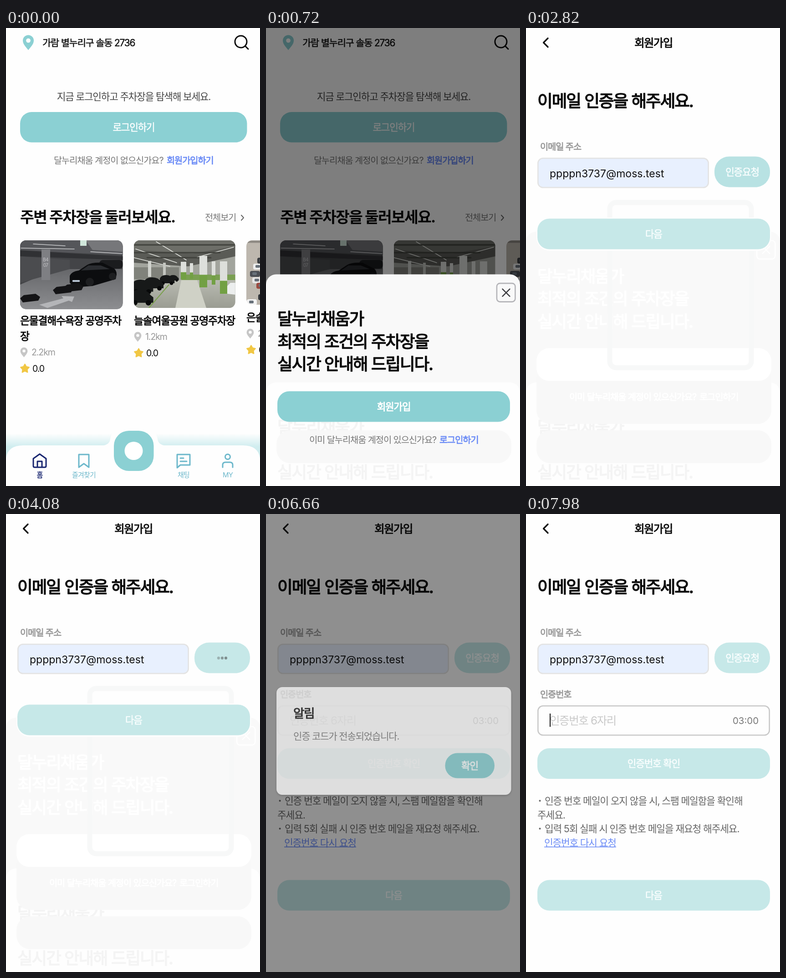
These frames come from a looping animation (558x1003 px, 8 s). An HTML page:

```html
<!DOCTYPE html>
<html lang="ko">
<head>
<meta charset="utf-8">
<title>Sign-up flow</title>
<style>
  html, body { margin: 0; width: 100%; height: 100%; overflow: hidden; background: #fefefe; }
  svg { display: block; width: 100vw; height: 100vh; }
  text { font-family: Inter, 'Noto Sans CJK KR', 'Noto Sans CJK', sans-serif; letter-spacing: -.055em; white-space: pre; }
  .latin { letter-spacing: 0; }
  .system { font-family: 'Noto Sans', sans-serif; letter-spacing: 0; }
  .pale text { fill: #fff; stroke: #fff; }
  .pale .fill { fill: #fff; }
  .pale .line { stroke: #fff; }
  .trace text { fill: #f4f4f4; stroke: #f4f4f4; }
  .trace .fill, .trace .line { display: none; }
</style>
</head>
<body>
<svg id="stage" viewBox="0 0 558 1003" preserveAspectRatio="none"></svg>
<script>
const LOOP = 8000, STEP = 60, SHEET_TOP = 446, SHEET_TRAVEL = 557;
const TEAL = '#8bd0d3', MIST = '#c6e8e8', LINK = '#6c8cf6', GRAY = '#777', NAV = '#6db8cb';
const BRAND = '달누리채움';
const EMAIL = 'ppppn3737@moss.test', SAMPLE = 'xyz@e.test';
const MEDIUM = .022, SEMI = .04;

// y is the optical middle of the line; bold is a stroke width in em, for weights between regular and bold
const text = (x, y, size, str, fill = '#0b0b0b', bold = 0, anchor = 'start', extra = '') =>
  `<text x="${x}" y="${y + size * .37}" font-size="${size}" fill="${fill}" text-anchor="${anchor}" ` +
  `${bold ? `stroke="${fill}" stroke-width="${size * bold}" stroke-linejoin="round"` : ''} ${extra}>${str}</text>`;
const mid = (x, y, size, str, fill, bold) => text(x, y, size, str, fill, bold, 'middle');
const rect = (x, y, x2, y2, r, fill, extra = '') =>
  `<rect x="${x}" y="${y}" width="${x2 - x}" height="${y2 - y}" rx="${r}" fill="${fill}" ${extra}/>`;
const path = (d, fill, extra = '') => `<path d="${d}" fill="${fill}" ${extra}/>`;
const line = (d, color, width, extra = '') =>
  path(d, 'none', `stroke="${color}" stroke-width="${width}" stroke-linecap="round" stroke-linejoin="round" ${extra}`);
const dot = (x, y, r, fill, extra = '') => `<circle cx="${x}" cy="${y}" r="${r}" fill="${fill}" ${extra}/>`;
const group = (id, body, extra = '') => `<g id="${id}" ${extra}>${body}</g>`;
const at = (x, y, body, scale = 1, extra = '') => `<g transform="translate(${x} ${y}) scale(${scale})" ${extra}>${body}</g>`;
const gradient = (id, stops) => `<linearGradient id="${id}" x2="0" y2="1">` +
  stops.map(([offset, color, alpha = 1]) => `<stop offset="${offset}" stop-color="${color}" stop-opacity="${alpha}"/>`).join('') +
  '</linearGradient>';

const pin = (x, y, scale, fill) => at(x, y,
  path('M0 17C-3 12-12 5-12-4A12 12 0 0 1 12-4C12 5 3 12 0 17Z', fill) + dot(0, -4, 4.8, '#fff'), scale);

function star(x, y) {
  const points = Array.from({ length: 10 }, (_, i) => {
    const a = i * Math.PI / 5, r = i % 2 ? 5.4 : 10;
    return `${(x + r * Math.sin(a)).toFixed(1)} ${(y - r * Math.cos(a)).toFixed(1)}`;
  });
  return path(`M${points.join('L')}Z`, '#f1c744', 'stroke="#f1c744" stroke-width="2" stroke-linejoin="round"');
}

const spot = (x, y, distance) =>
  pin(x + 8.5, y, .66, '#c6c6c6') + text(x + 25, y, 19.5, distance, '#999') +
  star(x + 10.5, y + 36) + text(x + 27, y + 36, 19.5, '0.0');

const darkGarage = () => {
  const rack = (x, y) => path(`M${x} ${y}l8-7 26-3 10 7-4 8-34 4Z`, '#141416');
  return rect(31, 465, 257, 616, 0, '#434447') +
    path('M31 465H257V497L140 492 31 486Z', '#55565a') +
    path('M175 465H257V490L190 486Z', '#76777a') +
    path('M31 487L257 500V508L31 500Z', '#303134') +
    path('M31 562L110 528H257V616H31Z', 'url(#floor)') +
    path('M31 500L140 508V528L31 558Z', '#4b4c4f') +
    line('M33 482L150 484M186 490L255 494M60 473L130 477', '#c9cacc', 1.6) +
    rect(78, 485, 97, 552, 0, '#7e7f83') + rect(163, 465, 177, 477, 0, '#cfe6da') +
    mid(87, 507, 10, 'B4', '#c5c5c8') + mid(87, 519, 10, '07', '#c5c5c8') +
    rect(205, 508, 257, 527, 8, '#1b1c1e') +
    path('M140 558V543Q144 533 160 531L178 519Q188 513 212 514L234 525Q243 528 243 540L241 550 190 565 150 568Z', '#0c0d0f') +
    path('M165 531L181 520H208L228 528Z', '#2b2d31') +
    dot(184, 556, 9, '#1d1e20') + dot(234, 544, 8, '#1d1e20') +
    rect(146, 552, 162, 556, 1, '#b7c3d2') +
    rack(31, 592) + rack(103, 574) + rack(126, 569) +
    path('M73 606L126 592 122 587 150 588 145 600 138 597 91 613Z', '#b4b5b8');
};

const brightGarage = () => {
  const column = (x, w, top, bottom) =>
    rect(x, top, x + w, bottom, 0, '#dddfdb') + rect(x, bottom - (bottom - top) * .4, x + w, bottom, 0, '#72a044');
  const car = (x, y, s) => at(x, y, path('M0 24V10Q4 0 18 0T38 10L43 14V24Z', '#171919') + dot(9, 24, 5, '#08090a') + dot(34, 24, 5, '#08090a'), s);
  return rect(281, 465, 504, 613, 0, '#a2a49d') +
    path('M281 465H504V500L400 522 281 514Z', '#5a5b56') +
    path('M281 465H504V478L410 494 281 486Z', '#6d6e68') +
    rect(281, 524, 380, 550, 0, '#80827b') + rect(385, 540, 504, 558, 0, '#7a9f52') +
    path('M360 552H504V613H281V600Z', 'url(#gloss)') + path('M385 552H420L440 613H372Z', '#cfd1c6') +
    line('M285 484L375 514M330 468L396 508M500 480L420 502M281 503L360 522', '#dfe1dc', 1.6) +
    line('M281 475H504M281 492H470M310 503H450', '#41423d', 3) +
    column(384, 12, 512, 550) + column(404, 7, 515, 549) +
    column(452, 8, 511, 562) + column(425, 17, 499, 568) + column(470, 16, 511, 582) +
    rect(312, 510, 319, 545, 0, '#d0d2cd') + rect(345, 514, 351, 543, 0, '#c4c6c0') +
    car(358, 541, .5) + car(338, 541, .75) + car(303, 546, 1) + car(276, 551, 1.1) + car(272, 573, 1.2) +
    line('M314 613L358 562', '#7ba04e', 2) +
    path('M486 582V565L493 558H504V584Z', '#eceeee');
};

const carPark = () => {
  const van = (x, y, c) => rect(x, y, x + 22, y + 13, 4, c) + rect(x + 5, y + 3, x + 15, y + 9, 2, '#68717a');
  return rect(528, 465, 570, 606, 0, '#bdb7ae') + line('M529 468H558', '#8e8a83', 5) +
    van(552, 503, '#3a3d41') + van(543, 516, '#edeeee') + van(536, 532, '#4a4e54') +
    van(541, 546, '#e6e6e6') + van(550, 558, '#9b4a40') + van(529, 594, '#f2f2f2') + van(554, 583, '#33363a');
};

const photo = (id, x, y2, x2, body) =>
  `<clipPath id="${id}">${rect(x, 465, x2, y2, 13, '#000')}</clipPath><g clip-path="url(#${id})">${body}</g>`;

const nav = () =>
  rect(0, 888, 558, 960, 0, 'url(#glow)') +
  path('M0 1003V942Q4 914 38 914H215Q228 911 229 900Q234 875 262 875H300Q328 875 333 900Q334 911 347 914H520Q554 914 558 942V1003Z', '#fefefe') +
  rect(237, 882, 324.5, 970, 33, TEAL) + dot(280.5, 926, 20, '#fff') +
  line('M60 943L74 933 88 943V959Q88 962 85 962H63Q60 962 60 959ZM69 962V949H79V962', '#17246f', 3) +
  line('M160 934H182V962L171 954 160 962Z', NAV, 3) +
  line('M376 934H404V957H383L376 963ZM383 942H390M383 949H397', NAV, 3) +
  line('M476 962V957Q476 951 482 951H492Q498 951 498 957V962', NAV, 3) +
  dot(487, 939, 5.5, 'none', `stroke="${NAV}" stroke-width="3"`) +
  mid(74, 978, 15, '홈', '#17246f', MEDIUM) + mid(171, 978, 15, '즐겨찾기', NAV) +
  mid(390, 978, 15, '채팅', NAV) + mid(487, 978, 15, 'MY', NAV);

const home = () =>
  pin(49, 31.5, 1, TEAL) + text(80, 32, 20.8, '가람 별누리구 솔동 2736', '#111', MEDIUM) +
  dot(516, 30, 13, 'none', 'stroke="#0b0b0b" stroke-width="3"') + line('M526 40L532 46', '#0b0b0b', 3) +
  mid(280.5, 150, 21.3, '지금 로그인하고 주차장을 탐색해 보세요.', '#444') +
  rect(31, 184, 529.5, 250.5, 25, TEAL) + mid(280.5, 217, 21.3, '로그인하기', '#fff', MEDIUM) +
  text(105, 290, 19.8, BRAND + ' 계정이 없으신가요?', GRAY) + text(353, 290, 19.8, '회원가입하기', LINK, SEMI) +
  text(31, 414, 33.5, '주변 주차장을 둘러보세요.', '#0b0b0b', 0, 'start', 'font-weight="700"') +
  text(437, 415, 19.8, '전체보기', GRAY) + line('M517 410L522 415.5 517 421', '#666', 2) +
  photo('p1', 31, 615.5, 256.5, darkGarage()) +
  photo('p2', 281, 613, 503.5, brightGarage()) +
  photo('p3', 528, 606, 600, carPark()) +
  text(31, 641, 22.8, '은물결해수욕장 공영주차', '#0b0b0b', SEMI) + text(31, 675, 22.8, '장', '#0b0b0b', SEMI) + spot(31, 710, '2.2km') +
  text(281, 641, 22.8, '늘솔여울공원 공영주차장', '#0b0b0b', SEMI) + spot(281, 676, '1.2km') +
  text(528, 634, 22.8, '은솔', '#0b0b0b', SEMI) + spot(528, 669, '2.6km') + nav();

// Coordinates relative to the sheet's top edge
const sheet = id =>
  rect(507, 19.5, 547.5, 60, 7, 'none', `id="${id}Ring" class="line" stroke="#b4b4b8" stroke-width="2.6"`) +
  line('M519.5 32L535.5 48M535.5 32L519.5 48', '#3c3c40', 2.4, 'class="line"') +
  [BRAND + '가', '최적의 조건의 주차장을', '실시간 안내해 드립니다.']
    .map((s, i) => text(25, 97 + i * 49.5, 36.5, s, '#0b0b0b', SEMI)).join('') +
  rect(25, 256, 536, 323, 26, TEAL, 'class="fill"') + mid(280.5, 290, 21.3, '회원가입', '#fff', SEMI) +
  text(95, 362, 19.8, `이미 ${BRAND} 계정이 있으신가요?`, GRAY) + text(381, 362, 19.8, '로그인하기', LINK, SEMI);

const button = (x, y, x2, label, radius = 26) =>
  rect(x, y, x2, y + 67, radius, MIST) + mid((x + x2) / 2, y + 33.5, 21.3, label, '#fafefe', MEDIUM);

const field = (id, x, y, x2) => rect(x, y, x2, y + 64, 11, '#fefefe', `id="${id}" stroke="#e3e3e3" stroke-width="2.6"`);
const caret = (id, y) => rect(52, y, 54, y + 29, 0, '#111', `id="${id}"`);

const form = () =>
  line('M48 22.5L38.5 32 48 41.5', '#0b0b0b', 3.2) + mid(280, 32, 24.2, '회원가입', '#0b0b0b', SEMI) +
  text(25, 159, 36.6, '이메일 인증을 해주세요.', '#0b0b0b', SEMI) +
  text(31, 260, 19.8, '이메일 주소', '#999', SEMI) +
  field('emailBox', 26.3, 285.3, 400.7) +
  text(52, 318, 23, SAMPLE, '#c9c9c9', 0, 'start', 'id="hint" class="latin"') +
  text(52, 318, 23, EMAIL, '#111', 0, 'start', 'id="email" class="latin"') + caret('emailCaret', 303) +
  rect(414, 281.5, 536, 348.5, 32, MIST) + rect(414, 281.5, 536, 348.5, 32, TEAL, 'id="ready"') +
  group('request', mid(475, 315, 21.3, '인증요청', '#fafefe', MEDIUM)) +
  group('dots', [467, 475, 483].map(x => dot(x, 315.4, 3.1, '#444')).join(''));

const popup = () =>
  path('M198 380H205L217 369.5 229 380H482Q496 380 496 394V728Q496 742 482 742H198Q184 742 184 728V394Q184 380 198 380Z', '#fefefe',
    'stroke="#d9d9d9" stroke-width="1" filter="url(#shadow)"') +
  rect(185, 487, 495, 701, 0, '#f9f9f9') +
  rect(185, 389, 495, 446, 0, '#efeff0', 'id="hover"') +
  [EMAIL, SAMPLE, 'noeu4691@moss.test', 'guest@e.test', 'owner@demo.test', 'eeee@e.test']
    .map((s, i) => text(204, 417 + i * 57.8, 20.2, s, '#1c1c1c', 0, 'start', 'class="system"')).join('');

const codeStep = () =>
  text(31, 395, 19.8, '인증번호', '#999', SEMI) + field('codeBox', 26.3, 420.3, 534.7) +
  text(52, 452, 24.4, '인증번호 6자리', '#c9c9c9') + caret('codeCaret', 437) +
  text(511, 452, 20.4, '03:00', '#777', 0, 'end', 'class="latin"') +
  button(25, 513, 536, '인증번호 확인') +
  dot(30.5, 628, 2, '#666') + text(41, 628, 21.5, '인증 번호 메일이 오지 않을 시, 스팸 메일함을 확인해', '#666') +
  text(25, 659, 21.5, '주세요.', '#666') +
  dot(30.5, 689, 2, '#666') + text(41, 689, 21.5, '입력 5회 실패 시 인증 번호 메일을 재요청 해주세요.', '#666') +
  text(40, 720, 21.4, '인증번호 다시 요청', LINK) + rect(40, 728.5, 198, 730, 0, LINK) +
  button(25, 801.5, 536, '다음');

const dialog = () =>
  rect(23, 379, 538.5, 615, 13, '#fefefe', 'filter="url(#shadow)"') +
  text(60, 436, 26.6, '알림', '#111', SEMI) + text(60, 486, 21, '인증 코드가 전송되었습니다.', GRAY) +
  rect(393.5, 523.5, 502, 578.5, 27, TEAL) + mid(447.5, 551, 21.3, '확인', '#fff', SEMI);

const shade = id => rect(0, 0, 558, 1003, 0, '#000', `id="${id}"`);

document.getElementById('stage').innerHTML =
  `<defs>${gradient('glow', [[0, '#d0edef', 0], [.4, '#d0edef']])}
   ${gradient('floor', [[0, '#66676a'], [1, '#8d8e91']])}${gradient('gloss', [[0, '#b9bbb2'], [1, '#9a9c92']])}
   <filter id="shadow" x="-10%" y="-10%" width="120%" height="120%"><feDropShadow dx="0" dy="2" stdDeviation="2" flood-opacity=".28"/></filter></defs>` +
  rect(0, 0, 558, 1003, 0, '#fefefe') +
  group('home', home() + shade('homeShade')) +
  group('panel', rect(0, 0, 558, 1100, 22, '#f9f9f9')) +
  group('wake', rect(0, 776, 558, 1100, 22, '#fefefe') + at(0, 776, sheet('trace'), 1, 'class="trace"') +
    rect(23, 881, 539, 953, 30, '#f8f8f8')) +
  group('sheet', sheet('sheet')) +
  group('residue', rect(23, 740, 539, 867, 30, '#f8f8f8') + rect(23, 701, 539, 773, 28, '#fff') + at(0, SHEET_TOP, sheet('pale')), 'class="pale"') +
  group('popupTrace', rect(184, 382, 495, 744, 14, 'none', 'stroke="#f7f8f8" stroke-width="11"')) +
  group('form', form()) +
  group('firstNext', rect(23, 415, 538.5, 488, 29, '#fefefe') + button(25, 417.5, 536, '다음')) +
  group('popup', popup()) +
  group('code', codeStep()) +
  shade('dialogShade') + group('dialog', dialog());

const $ = id => document.getElementById(id);
const ramp = (t, from, to) => Math.max(0, Math.min(1, (t - from) / (to - from)));
const easeOut = (p, power) => 1 - (1 - p) ** power;
const fade = (id, v) => { $(id).setAttribute('opacity', v); $(id).style.display = v > 0 ? '' : 'none'; };
const paint = (id, fill, focused) => {
  $(id).setAttribute('fill', fill);
  $(id).setAttribute('stroke', focused ? '#c9c9c9' : '#e3e3e3');
};

function draw(time) {
  const t = Math.floor(time / STEP) * STEP;
  const onHome = t < 1440, onCode = t >= 6480, onEmail = !onHome && !onCode;

  fade('home', +onHome);
  fade('homeShade', .5 * ramp(t, 420, 660));
  const top = SHEET_TOP + SHEET_TRAVEL * (1 - easeOut(ramp(t, 534, 949), 3));
  for (const id of ['panel', 'sheet']) $(id).setAttribute('transform', `translate(0 ${top.toFixed(2)})`);
  fade('panel', +(t >= 540 && !onCode));
  fade('sheet', +(t >= 540 && onHome));
  fade('sheetRing', +(t < 1260));
  fade('wake', +(t >= 720 && !onCode));
  fade('residue', +onEmail);
  fade('popupTrace', +(onEmail && t >= 2640));

  const filled = t >= 2220, focused = t >= 1860 && t < 2820;
  fade('form', +!onHome);
  fade('firstNext', +onEmail);
  paint('emailBox', filled ? '#e8f0fe' : '#fefefe', focused);
  fade('hint', +!filled);
  fade('email', +filled);
  fade('emailCaret', +(focused && !filled));
  fade('popup', t < 1860 ? 0 : 1 - ramp(t, 2340, 2640));
  fade('hover', +filled);

  const loading = onCode ? 0 : ramp(t, 3360, 3780);
  fade('ready', ramp(t, 2760, 3000) - ramp(t, 3360, 3780));
  fade('request', 1 - loading);
  fade('dots', loading);
  [...$('dots').children].forEach((d, i) =>
    d.setAttribute('opacity', .41 + .14 * Math.cos((t - 4080) / 990 * 2 * Math.PI + (2 - i) * 1.1)));

  const codeFocus = t >= 7980;
  fade('code', +onCode);
  paint('codeBox', '#fefefe', codeFocus);
  fade('codeCaret', +codeFocus);
  const open = ramp(t, 6480, 6840), stay = 1 - ramp(t, 7320, 7560);
  fade('dialogShade', .5 * easeOut(open, 3) * stay);
  fade('dialog', easeOut(open, 1.8) * stay);
}

const start = performance.now();
function tick() {
  draw((performance.now() - start) % LOOP);
  requestAnimationFrame(tick);
}
tick();
</script>
</body>
</html>
```
